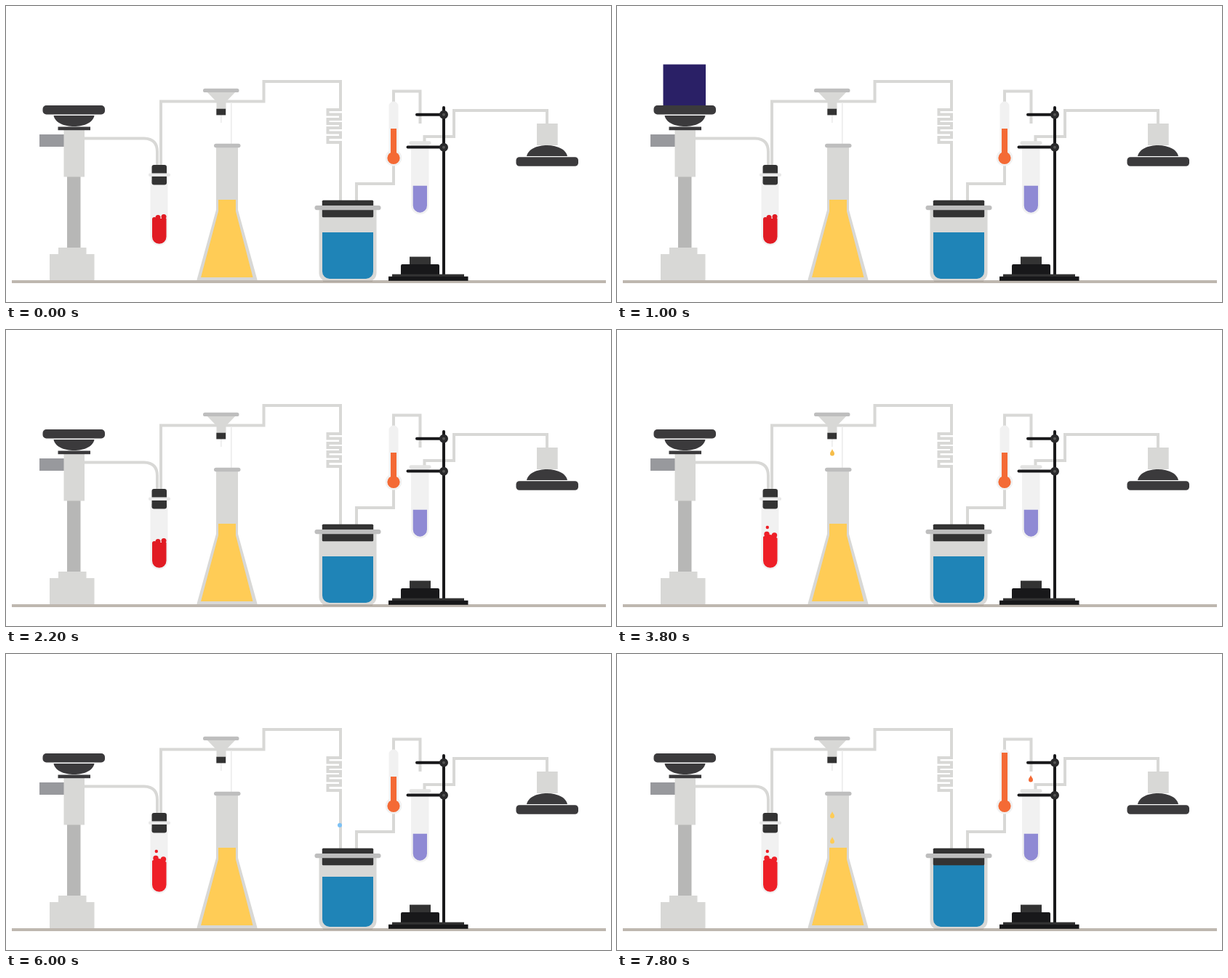
Recreate the animation shown at these times as an HTML page. Size 832 px wide and 408 px high, loop 8000 ms.

```html
<!DOCTYPE html>
<html lang="en">
<head>
<meta charset="utf-8">
<title>Laboratory</title>
<style>
  html, body { margin: 0; width: 100%; height: 100%; overflow: hidden; background: #fff; }
  svg { display: block; width: 832px; height: 408px; }
  .pipe { fill: none; stroke: #d8d8d6; stroke-width: 4; }
  .glass { fill: #f1f1f1; }
  .light { fill: #d8d8d6; }
  .rim { fill: #bebebe; }
  .dark { fill: #3b3a3c; }
  .cap { fill: #333; }
  .iron { fill: #18181a; }
  .thin { stroke: #eee; stroke-width: 2; }
  .arm { stroke: #18181a; stroke-width: 4; stroke-linecap: round; }
  .yellow { fill: #ffcc56; }
  .orange { fill: #f46a35; }
</style>
</head>
<body>
<svg viewBox="0 0 832 408">
  <defs>
    <path id="drop" d="M0-5C1-2 3-1 3 1.5A3 3 0 0 1-3 1.5C-3-1-1-2 0-5Z"/>
    <clipPath id="abovePlate"><rect x="50" width="90" height="138"/></clipPath>
  </defs>

  <!-- Pipes -->
  <g class="pipe">
    <path d="M108 182.5H190Q208 183 208 201V220"/>
    <path d="M213 220V131.5H354.5V104H460V143H442.5V149.5H460V156H442.5V162H460V168H442.5V174.5H460V181H442.5V188H460V270"/>
    <path d="M482 270V245H533V216"/>
    <path d="M533 135V117.5H569.5V162"/>
    <path d="M575.5 188V180H616V144H744V163"/>
  </g>

  <!-- Red tube -->
  <path class="glass" d="M198.5 240H222.5V318A12 12 0 0 1 198.5 318Z"/>
  <g id="calm" fill="#e11b23">
    <path d="M201 293H220.5V318A9.75 9.75 0 0 1 201 318Z"/>
    <circle cx="204" cy="294" r="3"/><circle cx="209" cy="291.5" r="3.5"/><circle cx="217" cy="290.5" r="3.5"/>
  </g>
  <g id="bubbly" fill="#ee1f27">
    <path d="M201 285Q210 278 220.5 287V318A9.75 9.75 0 0 1 201 318Z"/>
    <circle cx="206" cy="281.5" r="3.7"/><circle cx="216.5" cy="283" r="3.7"/><circle cx="206.8" cy="272" r="2.2"/>
  </g>

  <circle id="dot" r="3" fill="#7cc1f5"/>

  <rect class="cap" x="200.5" y="219" width="20.5" height="27.5" rx="3"/>
  <rect x="196" y="230.5" width="30" height="4.5" rx="2" fill="#e8e8e8"/>

  <!-- Left stand -->
  <g clip-path="url(#abovePlate)">
    <rect id="tile" x="63.5" width="58.5" height="56.5" fill="#2a2066"/>
  </g>
  <rect x="46" y="177" width="34" height="17" fill="#98999d"/>
  <rect x="84" y="235" width="18.5" height="99" fill="#b7b7b6"/>
  <path class="light" d="M79.500 171H108V235.500H79.500ZM72 333H110.500V342H121.500V378.500H60V342H72Z"/>
  <rect class="dark" x="71.5" y="166.500" width="44.500" height="4.700"/>
  <path class="dark" d="M65.500 151H121.500C118 171 69 171 65.500 151Z"/>
  <rect class="dark" x="50.500" y="137" width="85.500" height="12.500" rx="5"/>

  <!-- Funnel and flask -->
  <path class="thin" d="M295.800 150V161M309.800 133V190"/>
  <path class="light" d="M276 118H316L302.500 132V142H289.500V132Z"/>
  <rect class="rim" x="271" y="113.700" width="49.500" height="5.300" rx="2.600"/>
  <rect class="cap" x="289.300" y="141.700" width="12.900" height="8.700"/>
  <path class="light" d="M289 194H319V281L346 379H262L289 281Z"/>
  <rect class="rim" x="286" y="189.700" width="36.500" height="5.600" rx="2.800"/>
  <path class="yellow" d="M292 267H316V283L339.500 374H268L292 283Z"/>
  <g class="yellow">
    <use id="topDrop" href="#drop" x="296" y="169" fill="#f6bd49"/>
    <use id="midDrop" href="#drop" x="296" y="222"/>
    <use id="lowDrop" href="#drop" x="296" y="257"/>
  </g>

  <!-- Beaker -->
  <path class="light" d="M430.500 279H509.500V368A12 12 0 0 1 497.500 380H442.500A12 12 0 0 1 430.500 368Z"/>
  <path id="blue" fill="#1f84b7"/>
  <rect class="cap" x="434.800" y="267.700" width="70.400" height="23.500" rx="1.500"/>
  <rect class="rim" x="424.500" y="275" width="91" height="6.200" rx="3"/>

  <!-- Thermometer -->
  <path class="glass" d="M526.500 138A6.500 6.500 0 0 1 539.500 138V200A11.300 11.300 0 1 1 526.500 200Z"/>
  <circle class="orange" cx="533" cy="209.500" r="8.600"/>
  <rect id="mercury" class="orange" x="529" width="8"/>
  <use id="orangeDrop" class="orange" href="#drop" x="569" y="172"/>

  <!-- Purple tube and iron stand -->
  <path class="glass" d="M557 190H581.500V275A12.250 12.250 0 0 1 557 275Z"/>
  <path fill="#8f8ad4" d="M559.700 247.700H579V275A9.650 9.650 0 0 1 559.700 275Z"/>
  <rect x="554.500" y="186.300" width="30" height="5" rx="2.500" fill="#e3e3e2"/>
  <path class="arm" d="M602 140V370M565 149.800H602M552.500 194.500H602"/>
  <g fill="#555" stroke="#29292b" stroke-width="4">
    <circle cx="602" cy="149.700" r="4"/><circle cx="602" cy="194.700" r="4"/>
  </g>
  <rect class="cap" x="555" y="345.600" width="29" height="12"/>
  <rect class="iron" x="543" y="356" width="53" height="16" rx="2"/>
  <rect class="cap" x="531" y="369.700" width="99" height="4"/>

  <!-- Right lamp -->
  <rect class="light" x="730" y="162" width="28.700" height="30"/>
  <path class="dark" d="M716 207C720 187 768 187 772 207Z"/>
  <rect class="dark" x="701.500" y="208.300" width="85.500" height="12.400" rx="4.500"/>

  <!-- Bench -->
  <rect x="8" y="378" width="817" height="4" fill="#beb7af"/>
  <path d="M436 379.500H504" stroke="#aaa39b"/>
  <rect class="iron" x="526" y="372.800" width="109.500" height="6"/>
</svg>
<script>
const LOOP = 8000, STEP = 200;
const el = id => document.getElementById(id);
const show = (id, on) => el(id).setAttribute('visibility', on ? 'visible' : 'hidden');
const ramp = (t, start, end) => Math.min(1, Math.max(0, (t - start) / (end - start)));

// Routes of the travelling dot; the ends are hidden behind the apparatus.
const trips = [
  [1400, 2200, 'M84 182.5H190Q208 183 208 201V238'],
  [2600, 3600, 'M213 262V131.5H296'],
  [4600, 6000, 'M309 131.5H354V104H459V236']
].map(([start, end, d]) => {
  const path = document.createElementNS('http://www.w3.org/2000/svg', 'path');
  path.setAttribute('d', d);
  return { start, end, path, length: path.getTotalLength() };
});

function draw(t) {
  el('tile').setAttribute('y', 60.5 + 80 * ramp(t, 800, 1600));
  el('tile').setAttribute('opacity', ramp(t, 0, 800));
  show('tile', t < 1600);

  const trip = trips.find(({ start, end }) => t >= start && t <= end);
  show('dot', trip);
  if (trip) {
    const p = trip.path.getPointAtLength(trip.length * ramp(t, trip.start, trip.end));
    el('dot').setAttribute('cx', p.x);
    el('dot').setAttribute('cy', p.y);
  }

  show('calm', t < 2400);
  show('bubbly', t >= 2400);
  show('topDrop', t === 3800);
  show('midDrop', t === 4000 || t >= 6200);
  show('lowDrop', t === 4200 || t >= 6400);

  const level = 312 - 5 * ramp(t, 4400, 4800) - 16 * ramp(t, 6000, 6800);
  el('blue').setAttribute('d',
    `M435 ${level}H505V366A10 10 0 0 1 495 376H445A10 10 0 0 1 435 366Z`);

  const top = 169 - 33 * ramp(t, 7000, 7800);
  el('mercury').setAttribute('y', top);
  el('mercury').setAttribute('height', 207 - top);
  show('orangeDrop', t >= 7600);
}

function frame() {
  draw(Math.floor(performance.now() % LOOP / STEP) * STEP);
  requestAnimationFrame(frame);
}
frame();
</script>
</body>
</html>
```
